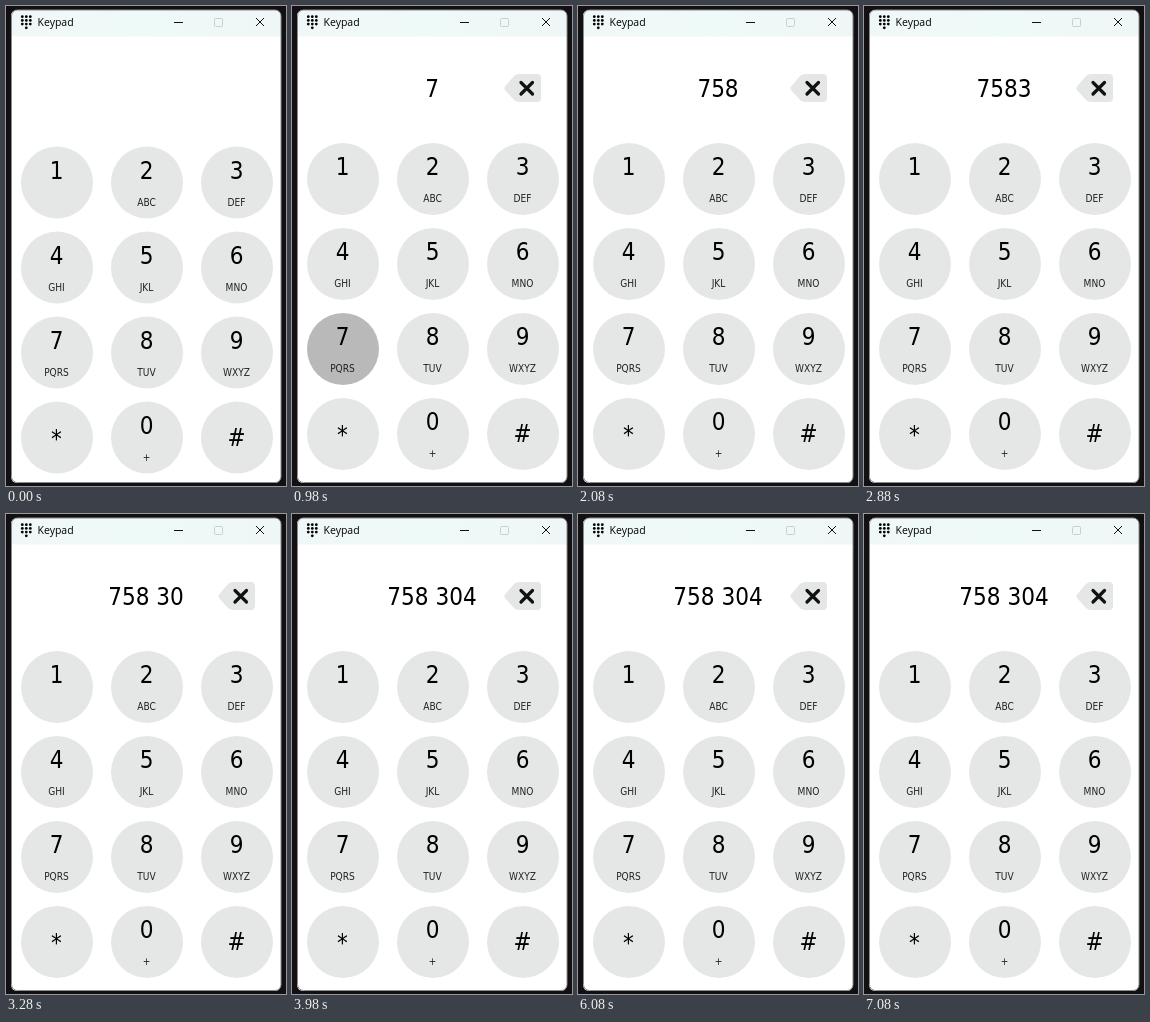
Recreate the animation shown at these times as an HTML page. Size 280 px wide and 480 px high, loop 7.78 s.

```html
<!DOCTYPE html>
<html lang="en">
<head>
<meta charset="utf-8">
<title>Keypad</title>
<style>
  html, body { margin: 0; width: 100%; height: 100%; overflow: hidden; background: #121013; }
  svg { display: block; width: 280px; height: 480px; }
  text { font-family: "DejaVu Sans Condensed", "Noto Sans", sans-serif; font-size: 24px; text-anchor: middle; }
  .small { font-size: 10.1px; fill: #222; }
  .title { font: 10.5px "Open Sans", sans-serif; text-anchor: start; }
  .line { fill: none; stroke: #111; }
</style>
</head>
<body>
<svg viewBox="0 0 280 480">
  <defs>
    <linearGradient id="bar">
      <stop offset="0" stop-color="#f0f8f7"/>
      <stop offset=".5" stop-color="#eefaf8"/>
      <stop offset="1" stop-color="#eff6f6"/>
    </linearGradient>
    <clipPath id="frame"><rect x="5" y="4" width="270" height="473" rx="6"/></clipPath>
  </defs>
  <g clip-path="url(#frame)">
    <rect width="280" height="480" fill="#fff"/>
    <rect width="280" height="30.5" fill="url(#bar)"/>
  </g>
  <rect x="5.500" y="4" width="269.500" height="472.500" rx="6" fill="none" stroke="#8a8c8c"/>
  <g id="dots"></g>
  <text class="title" x="31.5" y="20.3">Keypad</text>
  <path class="line" d="M168 16.5h9M250 12l8 8m0-8l-8 8"/>
  <rect class="line" x="208.5" y="12.5" width="8" height="8" rx="1" style="stroke:#c8cfce"/>
  <g id="keys"></g>
  <text id="number" x="140" y="91"></text>
  <g id="erase">
    <path d="M213 80.5L222 70Q224 68 227 68H245Q249 68 249 72V92Q249 96 245 96H227Q224 96 222 94L213 84Q211.5 82 213 80.5Z" fill="#e5e7e6"/>
    <path class="line" d="M229 76.5l11.500 11.5m0-11.500l-11.500 11.500" stroke-width="3.2" stroke-linecap="round"/>
  </g>
  <g id="copy" class="line" style="stroke:#333" stroke-width="1.5" stroke-linejoin="round">
    <path d="M34.800 68H67.800V103.500H34.800Z" fill="#e5e7e6"/>
    <path d="M42 71.500V69Q42 65.500 45.500 65.500H47.500C46 59 57 59 55.500 65.500H57.500Q61 65.500 61 69V71.500Z" fill="#e5e7e6"/>
    <path d="M42 88l5.500 6.500L59.500 81" stroke-width="1.400"/>
  </g>
</svg>
<script>
const LOOP = 7780;
const START_DROP = 3.5;
const $ = id => document.getElementById(id);

function add(parent, tag, attrs, content = "") {
  const node = document.createElementNS("http://www.w3.org/2000/svg", tag);
  for (const name in attrs) node.setAttribute(name, attrs[name]);
  node.textContent = content;
  return parent.appendChild(node);
}

for (let i = 0; i < 10; i++) {
  const col = i < 9 ? i % 3 : 1;
  add($("dots"), "circle", { cx: 16.3 + col * 4, cy: 10.7 + Math.floor(i / 3) * 3.7, r: 1.4 });
}

const letters = ["", "ABC", "DEF", "GHI", "JKL", "MNO", "PQRS", "TUV", "WXYZ", "", "+", ""];
const discs = {};
[..."123456789*0#"].forEach((key, i) => {
  const x = 51 + (i % 3) * 90;
  const y = 173 + Math.floor(i / 3) * 85;
  const baseline = { "*": 9, "#": 8 }[key] ?? -4;
  discs[key] = add($("keys"), "circle", { cx: x, cy: y, r: 36 });
  add($("keys"), "text", { x: x - .5, y: y + baseline }, key);
  add($("keys"), "text", { x: x - .5, y: y + 23, class: "small" }, letters[i]);
});

// Each entry: time typed, key, how long the key stays dark
const presses = [
  [980, "7", 100], [1680, "5", 0], [1880, "8", 100],
  [2380, "3", 100], [3080, "0", 200], [3680, "4", 100]
];

const format = s => s.length > 4 ? s.slice(0, 3) + " " + s.slice(3) : s;
const show = (id, on) => $(id).setAttribute("visibility", on ? "visible" : "hidden");

function draw(now) {
  const t = now % LOOP;
  const typed = presses.filter(([at]) => t >= at);
  const [at, key, hold] = typed.at(-1) ?? [0, "", 0];
  for (const k in discs)
    discs[k].setAttribute("fill", k === key && t < at + hold ? "#b9b9b9" : "#e5e7e6");
  $("number").textContent = format(typed.map(p => p[1]).join(""));
  $("keys").setAttribute("transform", `translate(0 ${typed.length ? 0 : START_DROP})`);
  show("erase", typed.length);
  show("copy", t >= 5280 && t < 6080);
}

const began = performance.now();
function tick() {
  draw(performance.now() - began);
  requestAnimationFrame(tick);
}
tick();
</script>
</body>
</html>
```
